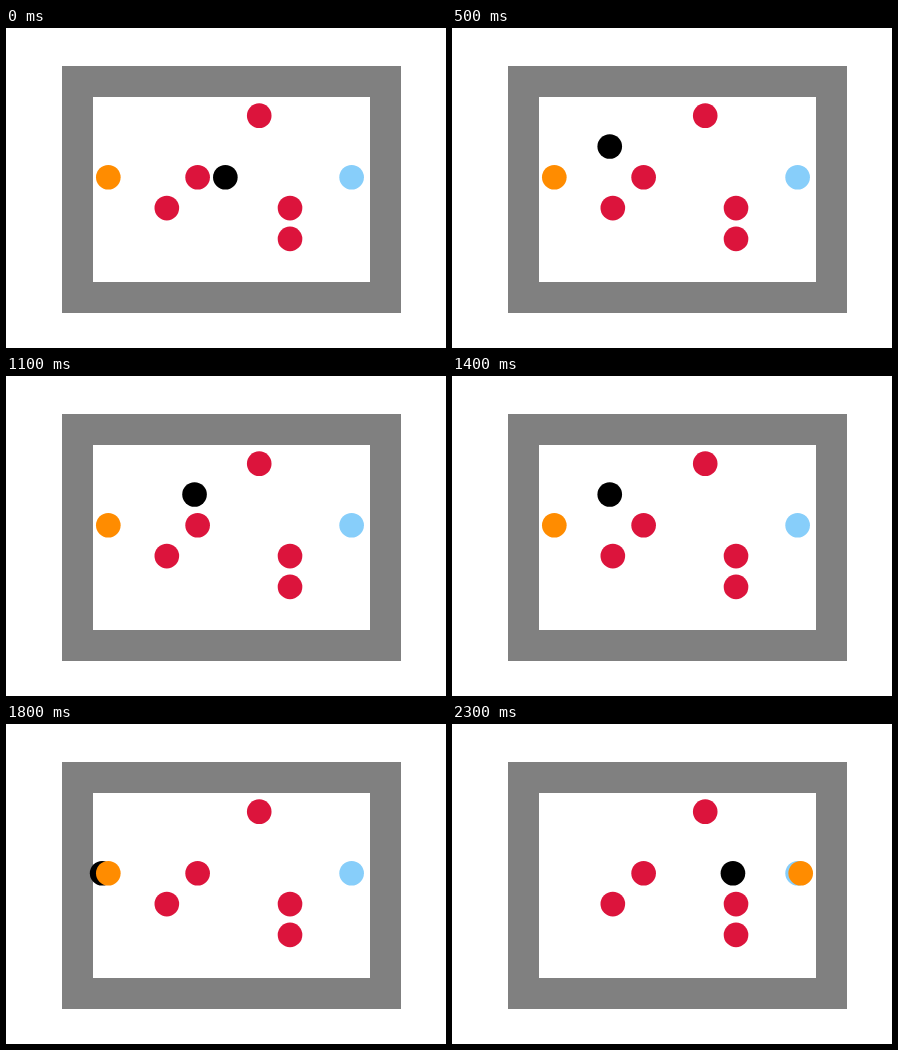
These frames come from a looping animation (440x320 px, 2400 ms). An HTML page with a canvas:

```html
<!DOCTYPE html>
<html lang="en">
<head>
<meta charset="utf-8">
<title>Grid courier</title>
<style>
  html, body { margin: 0; width: 100%; height: 100%; overflow: hidden; background: #fff; }
  canvas { display: block; }
</style>
</head>
<body>
<canvas id="stage" width="440" height="320"></canvas>
<script>
const ctx = document.getElementById('stage').getContext('2d');
const CELL = 30.8, LEFT = 56.1, TOP = 38.4, RADIUS = 0.4 * CELL;
const STEP_MS = 100;

// Agent column for each step; the list covers one loop.
const columns = [5, 5, 5, 3, 2, 3, 2, 3, 3, 2, 3, 4, 3, 2, 3, 2, 3, 2, 1, 3, 5, 7, 9, 7];
const PICK_UP = 18, DROP = 22;
const parcelHome = 1, goal = 9;
const hazards = [[6, 1], [4, 3], [3, 4], [7, 4], [7, 5]];

function fillBox(x, y, right, bottom, color) {
  ctx.fillStyle = color;
  ctx.fillRect(x, y, right - x, bottom - y);
}

function disc(col, row, offset, color) {
  ctx.fillStyle = color;
  ctx.beginPath();
  ctx.arc(LEFT + (col + offset) * CELL, TOP + (row + 0.6) * CELL, RADIUS, 0, 2 * Math.PI);
  ctx.fill();
}

function draw(step) {
  const col = columns[step];
  const row = step === 0 || step >= PICK_UP ? 3 : 2;
  const parcel = step < PICK_UP ? parcelHome : columns[Math.min(step, DROP)];

  fillBox(0, 0, 440, 320, '#fff');
  fillBox(56, 38, 395, 285, '#808080');
  fillBox(87, 69, 364, 254, '#fff');

  disc(col, row, 0.3, '#000');
  for (const [x, y] of hazards) disc(x, y, 0.4, '#dc143c');
  disc(goal, 3, 0.4, '#87cefa');
  disc(parcel, 3, 0.5, '#ff8c00');
}

const begin = performance.now();

function tick() {
  const elapsed = performance.now() - begin;
  draw(Math.floor(elapsed / STEP_MS) % columns.length);
  requestAnimationFrame(tick);
}

tick();
</script>
</body>
</html>
```
